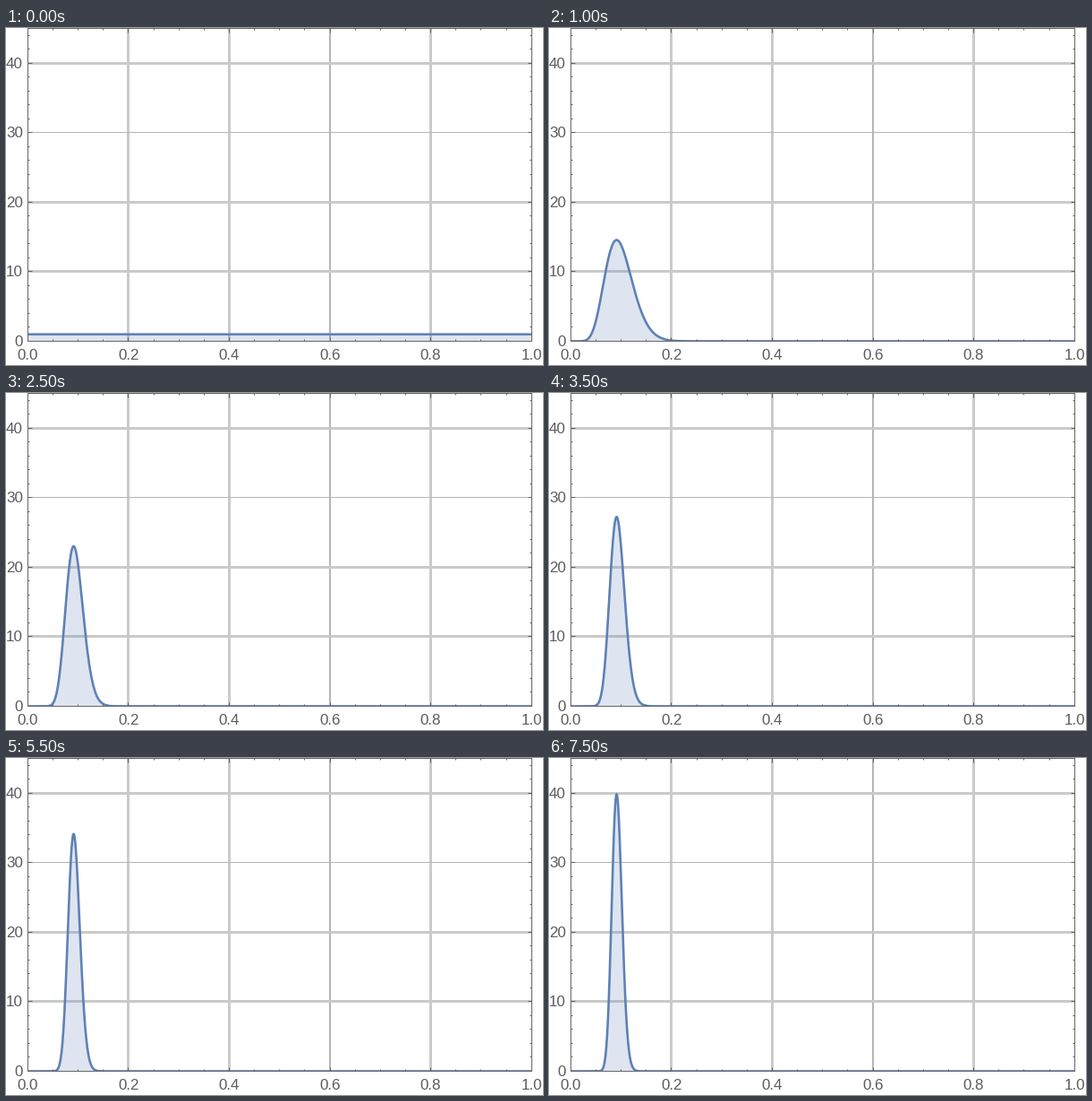
Animation, 600 px wide and 376 px high, one loop 8000 ms. Source, as a matplotlib script:

```python
import math
import numpy as np
import matplotlib.pyplot as plt
from matplotlib.animation import FuncAnimation
from matplotlib.transforms import Affine2D

W, H, DPI = 600, 376, 100
PX = 72 / DPI                      # one pixel in points
LEFT, RIGHT, BOTTOM, TOP = 23.9, 586.65, 27, 376
Y_MAX = 45
FRAMES, STEP_MS = 16, 500
BLUE, GRAY, GRID, THIN, INK = "#5e81b5", "#666666", "#c9cbc9", "#b4b7b4", "#5c5c5c"

plt.rcParams["font.family"] = "Liberation Sans"

fig = plt.figure(figsize=(W / DPI, H / DPI), dpi=DPI, facecolor="white")
ax = fig.add_axes([LEFT / W, BOTTOM / H, (RIGHT - LEFT) / W, (TOP - BOTTOM) / H])
ax.set_xlim(0, 1)
ax.set_ylim(0, Y_MAX)

# Grid
for x, w in zip((0.2, 0.4, 0.6, 0.8), (3, 3, 2, 3)):
    ax.axvline(x, color=GRID if w > 2 else THIN, lw=w * PX, zorder=0.5)
for y, w in zip((10, 20, 30, 40), (3, 3, 1, 3)):
    ax.axhline(y, color=GRID if w > 2 else THIN, lw=w * PX, zorder=0.5)

# Frame and ticks
for spine in ax.spines.values():
    spine.set(color=GRAY, linewidth=PX)
ax.set_axisbelow(False)
ax.set_xticks(np.linspace(0, 1, 6))
ax.set_xticks(np.linspace(0, 1, 21), minor=True)
ax.set_yticks(range(0, Y_MAX, 10))
ax.set_yticks(range(0, Y_MAX, 2), minor=True)
for which, size in (("major", 4.5), ("minor", 2.5)):
    ax.tick_params(which=which, direction="in", length=size * PX, width=PX,
                   color=GRAY, top=True, right=True,
                   labelbottom=False, labelleft=False)


def label(x, y, text, align):
    fig.text(x / W, y / H, text, ha=align, va="baseline",
             fontsize=17 * PX, color=INK)


for i in range(6):
    label(LEFT + 0.5 + (RIGHT - LEFT) * i / 5, 6, f"{i / 5:.1f}", "center")
for v in range(0, Y_MAX, 10):
    label(18.8, BOTTOM + (TOP - BOTTOM) * v / Y_MAX - 6, str(v), "right")

# Beta density after n rounds of 5 successes and 50 failures
xs = np.linspace(0, 1, 2001)
inner = np.clip(xs, 1e-12, 1 - 1e-12)


def density(n):
    a, b = 5 * n, 50 * n
    log_norm = math.lgamma(a + b + 2) - math.lgamma(a + 1) - math.lgamma(b + 1)
    return np.exp(log_norm + a * np.log(inner) + b * np.log1p(-inner))


# The frame lines snap to pixel centres, so the curve moves half a pixel too
centred = ax.transData + Affine2D().translate(0.5, -0.5)
area, = ax.fill([0, 1, 1], [0, 0, 0], color=BLUE, alpha=0.2, lw=0, zorder=1,
                transform=centred)
curve, = ax.plot([], [], color=BLUE, lw=2.6 * PX, zorder=2, snap=False,
                 solid_capstyle="butt", solid_joinstyle="round",
                 transform=centred)
ax.set_xlim(0, 1)
ax.set_ylim(0, Y_MAX)


def update(n):
    ys = density(n)
    curve.set_data(xs, ys)
    area.set_xy(np.column_stack([np.r_[0, xs, 1], np.r_[0, ys, 0]]))
    return area, curve


anim = FuncAnimation(fig, update, frames=FRAMES, interval=STEP_MS,
                     repeat=True, repeat_delay=0, blit=False)
plt.show()
```
